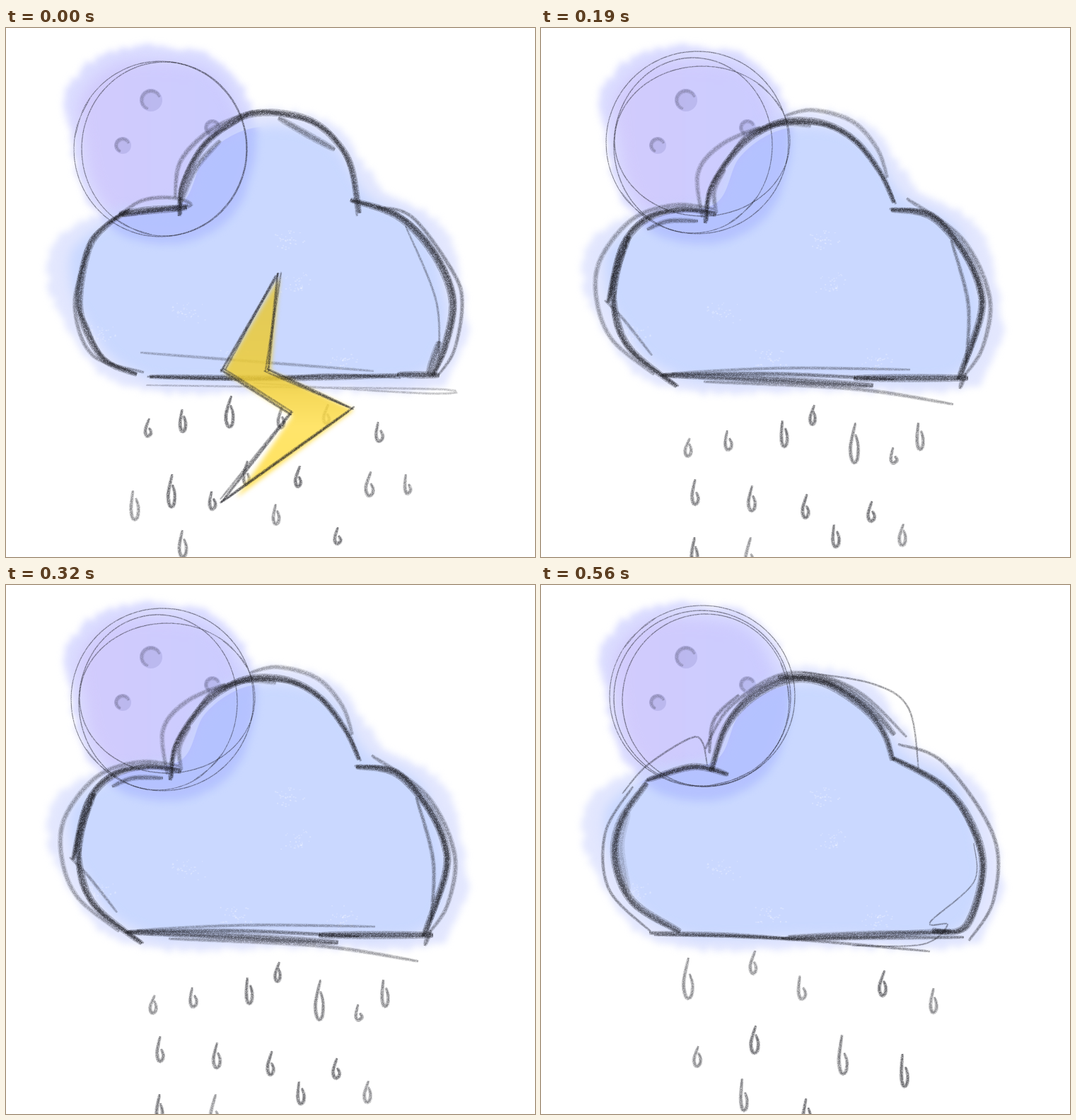
Animation of 748 by 748 pixels, one loop 640 ms. Source, as an HTML page with a canvas:

```html
<!DOCTYPE html>
<html lang="en">
<head>
<meta charset="utf-8">
<title>Storm cloud sketch</title>
<style>
html, body { margin: 0; width: 100%; height: 100%; overflow: hidden; background: #fff; }
canvas { display: block; }
</style>
</head>
<body>
<canvas id="stage" width="748" height="748"></canvas>
<script>
const SIZE = 748;
let seed = 7;
const rand = () => (seed = seed * 16807 % 2147483647) / 2147483647;
const jitter = r => (rand() - 0.5) * 2 * r;

function sheet(size = SIZE) {
  const c = document.createElement('canvas');
  c.width = c.height = size;
  return c;
}

// Pencil grain: dark pixels of uneven opacity
function makeGrain() {
  const tile = sheet(128), t = tile.getContext('2d');
  const img = t.createImageData(128, 128);
  for (let i = 0; i < img.data.length; i += 4)
    img.data.set([32, 32, 38, rand() < 0.35 ? 100 + 90 * rand() : 215 + 40 * rand()], i);
  t.putImageData(img, 0, 0);
  return tile;
}
const grainTile = makeGrain();
let g, grain;

// Catmull-Rom samples through a flat list of x, y
function spline(flat, closed) {
  const n = flat.length / 2, out = [];
  const at = (i, k) => flat[2 * (closed ? (i + n) % n : Math.max(0, Math.min(n - 1, i))) + k];
  for (let i = 0; i < (closed ? n : n - 1); i++) {
    const steps = Math.max(3, Math.hypot(at(i + 1, 0) - at(i, 0), at(i + 1, 1) - at(i, 1)) / 4 | 0);
    for (let s = 0; s < steps; s++) {
      const t = s / steps;
      out.push([0, 1].map(k => {
        const a = at(i - 1, k), b = at(i, k), c = at(i + 1, k), d = at(i + 2, k);
        return b + 0.5 * t * (c - a + t * (2 * a - 5 * b + 4 * c - d + t * (3 * (b - c) + d - a)));
      }));
    }
  }
  if (!closed) out.push(flat.slice(-2));
  return out;
}

function polygon(pts) {
  const p = new Path2D();
  pts.forEach(([x, y]) => p.lineTo(x, y));
  p.closePath();
  return p;
}

function ribbon(pts, w) {
  const last = pts.length - 1, left = [], right = [];
  pts.forEach(([x, y], i) => {
    const a = pts[Math.max(0, i - 1)], b = pts[Math.min(last, i + 1)];
    const dx = b[0] - a[0], dy = b[1] - a[1], len = Math.hypot(dx, dy) || 1;
    const half = w / 2 * (0.55 + 0.45 * Math.sqrt(Math.abs(Math.sin(Math.PI * i / last))));
    left.push([x - dy / len * half, y + dx / len * half]);
    right.unshift([x + dy / len * half, y - dx / len * half]);
  });
  return polygon(left.concat(right));
}

// A tapered pencil stroke: faint broad edge, firmer core
function pen(w, alpha, ...flat) {
  const pts = spline(flat);
  g.fillStyle = grain;
  g.globalAlpha = alpha * 0.45;
  g.fill(ribbon(pts, w + Math.min(2.5, w * 0.3)));
  g.globalAlpha = alpha * 0.65;
  g.fill(ribbon(pts, w * 0.75));
  g.globalAlpha = 1;
}

// A firm stroke with a looser one over it
function sketch(w, alpha, ...flat) {
  pen(w, alpha, ...flat);
  pen(w * 0.6, alpha * 0.6, ...flat.map(v => v + jitter(4)));
}

function loop(cx, cy, rx, ry) {
  const pts = [], start = rand() * 6;
  for (let a = 0; a < 6.9; a += 0.4) pts.push(cx + rx * Math.cos(a + start), cy + ry * Math.sin(a + start));
  pen(1.3, 0.6, ...pts);
}

function craters() {
  for (const [x, y, r] of [[205, 102, 16], [165, 166, 12], [292, 141, 12]]) {
    g.fillStyle = 'rgba(90,90,160,.16)';
    g.beginPath();
    g.arc(x, y, r, 0, 7);
    g.fill();
    const rim = [];
    for (let a = 1.9; a < 6; a += 0.45) rim.push(x + (r - 3) * Math.cos(a), y + (r - 3) * Math.sin(a));
    pen(5, 0.24, ...rim);
  }
}

// Drops as x, bottom, height
function rain(...drops) {
  for (let i = 0; i < drops.length; i += 3) {
    const [x, y, h] = drops.slice(i, i + 3);
    const r = 2 + h * 0.05 + rand() * 1.5, top = 0.5 + rand() * 0.25;
    pen(4.6, 0.5 + rand() * 0.25, x + jitter(3), y - h, x - r, y - h * 0.4, x - r * 0.4, y - 3,
      x + r * 0.7, y - 5, x + r, y - h * top * 0.6, x + r * 0.3, y - h * top);
  }
}

const shrink = (flat, k, cx, cy) => flat.map((v, i) => i % 2 ? cy + (v - cy) * k : cx + (v - cx) * k);

// A soft, ragged patch of colour
function wash(flat, color, alpha, blur, rough) {
  g.filter = `blur(${blur}px)`;
  g.globalAlpha = alpha;
  g.fillStyle = color;
  g.fill(polygon(spline(flat, true).map(([x, y]) => [x + jitter(rough), y + jitter(rough)])));
  g.filter = 'none';
  g.globalAlpha = 1;
}

const cloud = [150, 256, 68, 305, 64, 376, 100, 445, 140, 490, 220, 516, 400, 512, 590, 513,
  640, 470, 652, 400, 615, 278, 530, 226, 470, 142, 400, 117, 330, 124, 272, 165, 236, 236];
const moon = [150, 32, 270, 33, 325, 70, 354, 150, 335, 240, 290, 289, 225, 306, 160, 290, 112, 240, 90, 150, 88, 85];

function paper() {
  g.fillStyle = '#fff';
  g.fillRect(0, 0, SIZE, SIZE);
  const lilac = g.createLinearGradient(100, 0, 350, 0);
  lilac.addColorStop(0, '#cec4fb');
  lilac.addColorStop(1, '#c4c5ff');
  const cloudBody = shrink(cloud, 0.9, 360, 345);
  wash(moon, '#c9ccff', 0.65, 5, 5);
  wash(shrink(moon, 0.87, 222, 168), lilac, 0.75, 10, 2);
  wash(cloud, '#ccd4fe', 0.55, 5, 5);
  wash(cloudBody, '#c7d6ff', 0.9, 8, 2);
  g.save();
  g.clip(polygon(spline(cloudBody, true)));
  g.globalCompositeOperation = 'multiply';
  wash(moon, '#e3e4ff', 0.85, 6, 2);
  g.restore();
  // Dry-brush specks
  g.fillStyle = 'rgba(255,255,255,.28)';
  for (let i = 0; i < 6; i++) {
    const cx = 120 + rand() * 460, cy = 290 + rand() * 180;
    for (let k = 0; k < 35; k++)
      g.fillRect(cx + jitter(14) + jitter(14), cy + jitter(9) + jitter(9), 1 + rand() * 2, 1 + rand());
  }
}

function poseA() {
  craters();
  loop(224, 171, 117, 123);
  loop(218, 171, 122, 124);

  sketch(8, .72, 245, 266, 250, 222, 280, 166, 325, 130, 360, 120, 400, 122, 435, 133, 465, 158, 488, 195, 500, 262);
  pen(6, .4, 239, 240, 247, 188, 290, 144, 350, 117);
  pen(7, .45, 303, 159, 267, 200, 246, 250);
  pen(8, .5, 385, 127, 425, 150, 465, 172);

  sketch(9, .75, 160, 263, 200, 258, 256, 254);
  pen(5, .4, 146, 276, 190, 245, 235, 240, 262, 250, 235, 258);
  sketch(8, .72, 175, 258, 145, 277, 118, 310, 104, 380, 112, 425, 140, 470, 185, 490);
  pen(5, .45, 118, 310, 97, 390, 122, 462, 195, 487);

  sketch(9, .75, 487, 243, 555, 267, 605, 320, 631, 385, 620, 450, 603, 492);
  pen(5, .5, 525, 253, 575, 268, 632, 345, 645, 390, 634, 455, 612, 490);
  pen(3, .4, 565, 280, 608, 385, 612, 470);
  pen(9, .6, 613, 443, 597, 490);

  sketch(7, .75, 203, 493, 350, 495, 460, 494, 555, 491);
  pen(8, .85, 553, 490, 613, 491);
  pen(4, .32, 190, 459, 330, 470, 520, 485);
  pen(3, .28, 198, 505, 400, 508, 618, 511, 600, 517, 350, 502);

  rain(201, 580, 28, 250, 573, 34, 316, 566, 46, 389, 568, 33, 453, 562, 30, 528, 587, 30, 340, 648, 36, 413, 651, 32,
    182, 697, 43, 234, 679, 48, 292, 683, 28, 382, 704, 31, 514, 664, 37, 568, 661, 30, 469, 732, 26, 250, 750, 40);
}

function poseB() {
  craters();
  loop(221, 162, 129, 129);
  loop(215, 166, 112, 124);
  loop(228, 160, 124, 106);

  sketch(8, .75, 232, 276, 240, 228, 268, 183, 300, 152, 345, 132, 400, 135, 445, 160, 480, 205, 499, 247);
  pen(8, .4, 300, 150, 340, 134, 382, 138);
  pen(6, .35, 228, 268, 222, 205, 255, 165, 310, 140);
  pen(6, .38, 345, 124, 385, 116, 440, 132, 475, 170, 490, 212);
  pen(6, .4, 248, 262, 245, 230, 260, 200);

  sketch(8, .72, 248, 264, 200, 256, 150, 270, 115, 310, 95, 388);
  pen(6, .55, 222, 273, 180, 273, 150, 285);
  sketch(8, .75, 125, 295, 103, 360, 108, 415, 130, 458, 192, 507);
  pen(6, .4, 245, 256, 190, 250, 130, 270, 85, 325, 78, 380, 100, 440, 160, 490);
  pen(4, .4, 90, 385, 115, 410, 157, 463);

  sketch(9, .78, 495, 257, 550, 266, 595, 312, 620, 365, 621, 410, 590, 497);
  pen(6, .45, 517, 241, 595, 298, 634, 380, 625, 450, 600, 490);
  pen(5, .5, 580, 300, 604, 390, 601, 475);
  pen(6, .6, 592, 510, 600, 488);

  sketch(8, .6, 172, 491, 280, 494, 470, 505);
  pen(9, .8, 442, 495, 604, 495);
  pen(5, .6, 170, 490, 330, 489, 500, 497);
  pen(4, .38, 185, 488, 340, 481, 522, 483);
  pen(5, .42, 230, 500, 440, 510, 583, 532);

  rain(208, 608, 28, 265, 599, 30, 344, 594, 39, 384, 563, 30, 443, 616, 58, 499, 618, 25, 536, 598, 40, 218, 676, 38,
    298, 685, 38, 374, 695, 36, 467, 700, 31, 417, 736, 34, 511, 734, 33, 217, 762, 42, 295, 768, 48);
}

function poseC() {
  craters();
  loop(228, 157, 131, 128);
  loop(233, 163, 118, 122);
  loop(228, 160, 125, 124);

  sketch(10, .66, 240, 264, 262, 200, 300, 158, 350, 134, 400, 138, 455, 173, 485, 210, 497, 248);
  pen(9, .55, 335, 130, 405, 136, 460, 168, 500, 212);
  pen(5, .42, 232, 232, 265, 175, 330, 130, 390, 127, 455, 155, 517, 215);
  pen(2.5, .5, 370, 123, 470, 140, 520, 175, 534, 260);
  pen(5, .45, 238, 238, 245, 190, 280, 155);

  pen(2.5, .5, 115, 295, 150, 255, 210, 217, 228, 222, 235, 255);
  sketch(8, .72, 265, 268, 215, 257, 150, 276);
  sketch(10, .6, 150, 280, 112, 335, 105, 390, 130, 448, 197, 490);
  pen(14, .25, 122, 320, 110, 370, 122, 435);
  pen(4, .5, 130, 285, 91, 350, 96, 430, 155, 490);

  sketch(9, .74, 498, 245, 565, 282, 605, 330, 625, 400, 600, 482, 553, 490);
  pen(5, .5, 505, 225, 570, 252, 640, 355, 640, 445, 605, 503);
  pen(2, .5, 612, 365, 612, 420, 550, 477, 575, 480, 540, 508, 440, 510);

  sketch(8, .6, 345, 500, 480, 495, 580, 489);
  pen(6, .65, 153, 492, 260, 495, 345, 500);
  pen(4, .5, 160, 495, 330, 499, 550, 518);
  pen(5, .55, 340, 500, 598, 498);

  rain(208, 586, 59, 300, 552, 35, 369, 588, 36, 483, 583, 38, 555, 607, 37, 302, 664, 41, 221, 683, 31,
    427, 693, 57, 514, 711, 48, 287, 745, 47, 376, 775, 49);
}

// Corners run: top, left elbow, notch, tip, right elbow, inner bend
function bolt(corners, fill = corners) {
  const yellow = g.createLinearGradient(0, 350, 0, 680);
  yellow.addColorStop(0, '#e3c53c');
  yellow.addColorStop(0.45, '#efcd36');
  yellow.addColorStop(0.65, '#ffe052');
  yellow.addColorStop(1, '#ffdc42');
  g.filter = 'blur(3px)';
  g.globalAlpha = 0.86;
  g.fillStyle = yellow;
  g.fill(polygon(fill.map(([x, y], i) => i === 3 ? [x + 20, y - 5] : [x + 3, y + 2])));
  g.filter = 'none';
  corners.forEach(([x, y], i) => {
    const [u, v] = corners[(i + 1) % corners.length];
    const ex = (u - x) * 0.02, ey = (v - y) * 0.02;
    pen(3.6, 0.7, x - ex, y - ey, u + ex, v + ey);
    pen(3, 0.5, x + jitter(7), y + jitter(5), u + jitter(7), v + jitter(5));
  });
}
const boltA = [[384, 349], [305, 484], [402, 546], [306, 669], [489, 538], [371, 483]];
const boltC = [[384, 348], [305, 487], [402, 566], [299, 671], [477, 544], [373, 480]];
const boltLow = [[391, 342], [297, 502], [410, 570], [312, 694], [511, 553], [373, 488]];

function render(...layers) {
  const c = sheet();
  g = c.getContext('2d');
  grain = g.createPattern(grainTile, 'repeat');
  layers.forEach(layer => layer());
  return c;
}

const base = render(paper);
const ground = () => g.drawImage(base, 0, 0);
const [a, b, c] = [poseA, poseB, poseC].map(pose => render(ground, pose));
const strike = (pose, ...shape) => render(() => g.drawImage(pose, 0, 0), () => bolt(...shape));
const frames = [
  [120, strike(a, boltA)],
  [240, b],
  [320, strike(c, boltC, boltA)],
  [440, b],
  [560, strike(a, boltLow)],
  [640, c]
];

const view = document.getElementById('stage').getContext('2d');
function play() {
  const t = performance.now() % 640;
  view.drawImage(frames.find(([end]) => t < end)[1], 0, 0);
  requestAnimationFrame(play);
}
play();
</script>
</body>
</html>
```
